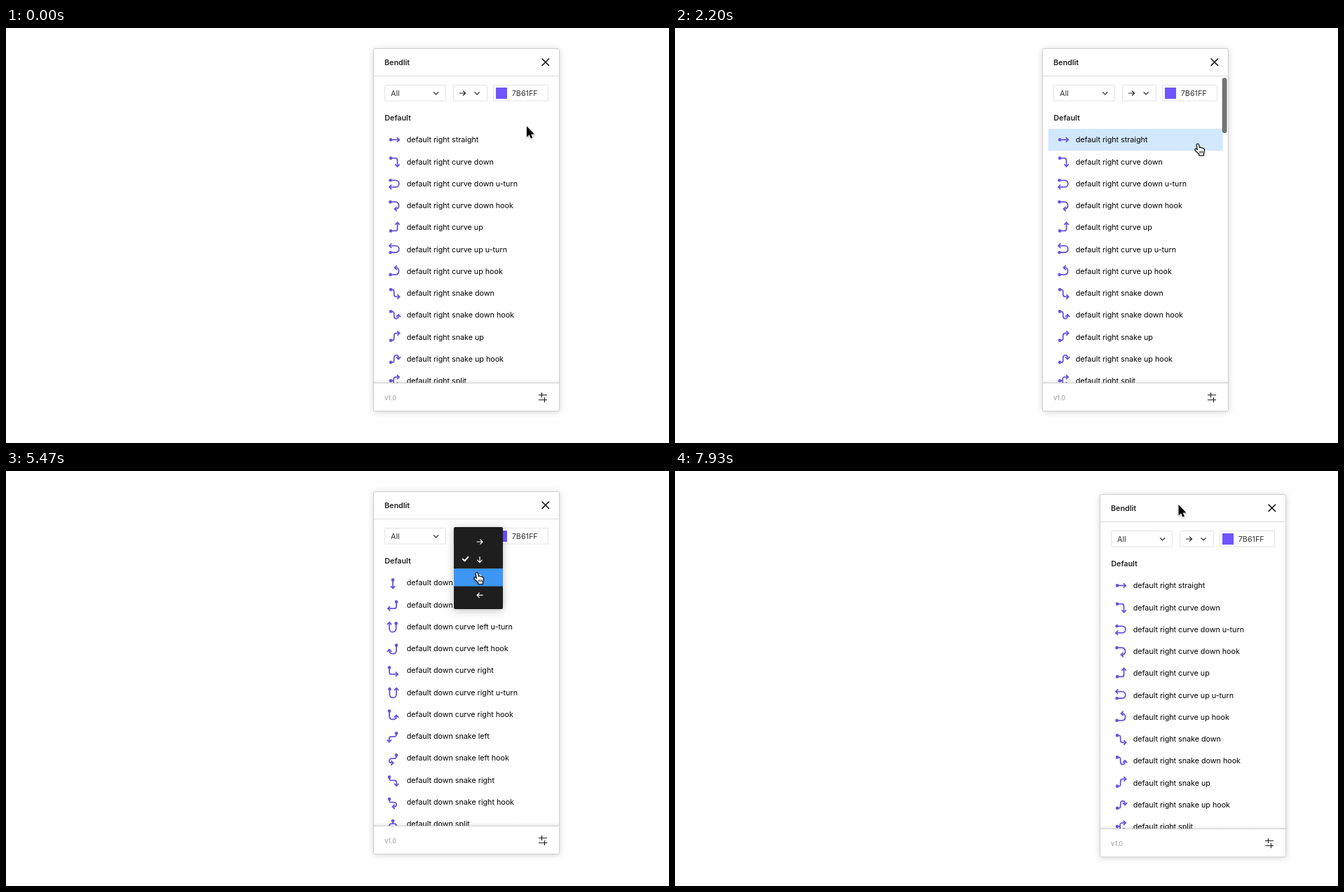
Recreate the animation shown at these times as an HTML page. Size 946x592 px, loop 8000 ms.

```html
<!DOCTYPE html>
<html lang="en">
<head>
<meta charset="utf-8">
<title>Connector panel</title>
<style>
  html, body { margin: 0; width: 100%; height: 100%; overflow: hidden; background: #fff; }
  svg { display: block; width: 946px; height: 592px; }
  text { font: 10.72px Inter, "Liberation Sans", sans-serif; fill: #000; white-space: pre; }
  .bold { font-weight: 600; fill: #222; }
  .ctl { fill: #333; }
  .box { fill: #fff; stroke: #e3e3e3; }
  .line { fill: none; stroke: #222; stroke-width: 1.2; stroke-linecap: round; stroke-linejoin: round; }
  .ico { fill: none; stroke: #6b52e0; stroke-width: 1.8; stroke-linecap: round; stroke-linejoin: round; }
  .ico .dot { fill: #6b52e0; stroke: none; }
  .ico .dash { stroke-dasharray: 2.6 3.2; }
  .shade { filter: drop-shadow(0 1px 4px rgba(0, 0, 0, .17)); }
  .menu { filter: drop-shadow(0 2px 6px rgba(0, 0, 0, .25)); }
  .ptr { filter: drop-shadow(0 1px 1px rgba(0, 0, 0, .3)); }
</style>
</head>
<body>
<svg viewBox="0 0 946 592" xmlns="http://www.w3.org/2000/svg">
  <defs>
    <clipPath id="view"><rect x="525" y="114" width="264" height="392"/></clipPath>
    <linearGradient id="fade" x2="0" y2="1">
      <stop offset="0" stop-opacity="0"/><stop offset="1" stop-opacity=".08"/>
    </linearGradient>
  </defs>
  <g id="panel">
    <rect class="shade" x="524.5" y="29.5" width="265" height="517" rx="2" fill="#fff" stroke="#cfcfcf"/>
    <g clip-path="url(#view)">
      <g id="hover"></g>
      <g id="lists"></g>
    </g>
    <text class="bold" x="540" y="52.9">Bendlit</text>
    <path class="line" style="stroke:#000;stroke-width:1.4" d="M765 44l9.6 9.6M774.6 44l-9.6 9.6"/>
    <path d="M525 68.5H789" stroke="#dcdcdc"/>
    <rect class="box" x="540.5" y="81.5" width="87" height="22.5" rx="1"/>
    <rect class="box" x="638.5" y="81.5" width="48" height="22.5" rx="1"/>
    <rect class="box" x="695.5" y="81.5" width="78" height="22.5" rx="1"/>
    <text class="ctl" x="549" y="96.9">All</text>
    <path class="line" d="M610.4 91.6l3.2 3.2 3.2-3.2M668.9 91.6l3.2 3.2 3.2-3.2"/>
    <g id="now" class="line"><path d="M-4 0H4M.8-3.2L4 0 .8 3.2"/></g>
    <rect x="699" y="85" width="16" height="16" fill="#7054ff"/>
    <text class="ctl" x="721.8" y="96.9">7B61FF</text>
    <rect x="525" y="502" width="264" height="4" fill="url(#fade)"/>
    <path d="M525 506.5H789" stroke="#d2d2d2"/>
    <text x="540" y="530.6" style="font-size:9.2px;fill:#999">v1.0</text>
    <path class="line" style="stroke-linecap:butt" d="M760 523.5h12M764.5 520v7M760 530.5h12M768.5 527v7"/>
    <rect id="thumb" x="780.7" y="71" width="6.8" height="79" rx="3.4" fill="#737373"/>
    <g id="menu">
      <rect class="menu" x="639" y="80" width="70" height="117" rx="2" fill="#1e1e1e"/>
      <rect id="pick" x="639" width="70" height="25.4" fill="#3d96f3"/>
      <g id="opts" class="line" style="stroke:#fff"></g>
      <path id="tick" class="line" style="stroke:#fff;stroke-width:2" d="M651.8 0l2.6 2.6 5-5.4"/>
    </g>
  </g>
  <g id="arrow" class="ptr">
    <path d="M0 0V15.6L3.6 12.3 5.9 17.4 8.3 16.4 6.1 11.4H10.9Z" stroke="#fff" stroke-width="1.2" paint-order="stroke"/>
  </g>
  <g id="hand" class="ptr">
    <path fill="#fff" stroke="#000" stroke-width="1.1" stroke-linejoin="round"
      d="M-1.8 2.2C-2.2 0 .8-.7 1.4 1.6L2.4 5.8C3.2 4.8 5 5 5.3 6.3 6.2 5.6 7.4 6 7.7 7.2 8.6 6.8 9.4 7.4 9.4 8.6 9.5 11 9.1 12.5 8.4 14V16.8H1.8V15C0 13.2-1.6 11.5-3.4 9.8-5.2 8-3.4 6.4-1.6 7.6L-.6 8.6Z"/>
    <path stroke="#000" stroke-width=".9" d="M2.9 10.3v3.4M4.9 10.3v3.4M6.9 10.3v3.4"/>
  </g>
</svg>
<script>
const $ = id => document.getElementById(id);
const ROW = 31.25, FIRST = 159.4, SECTION = 414, TICK = 200 / 3, TICKS = 120;
const ITEM = 25.4, ITEM_TOP = 88.3;

// Icon shapes for the "right" direction: start dot, path, arrow heads [x, y, angle]
const shapes = {
  straight: [-5, 0, "H7", [7, 0, 0]],
  curve: [-5, -5, "H1.5Q4.5-5 4.5-2V7", [4.5, 7, 90]],
  uturn: [-5.5, -4.6, "H2A4.8 4.8 0 0 1 2 5H-7", [-7, 5, 180]],
  hook: [-5.5, -5, "H1.5C8-5 8 5 2.5 5H.5", [.5, 5, 180]],
  snake: [-5, -5, "H-3.5Q-.3-5-.3-2V2Q-.3 5.2 3 5.2H7.5", [7.5, 5.2, 0]],
  snakeHook: [-5, -5, "H-3.5Q-.3-5-.3-2V1C-.3 6.4 6 6.4 6 2V-.5", [6, -.5, -90]],
  split: [-5, 0, "H-1M7-5.2H3Q-1-5.2-1-2V2Q-1 5.2 3 5.2H7", [7, -5.2, 0], [7, 5.2, 0]]
};

function glyph(kind, shape) {
  const [x, y, d, ...heads] = shapes[shape];
  const ring = (r, extra) => `<circle cx="${x}" cy="${y}" r="${r}" ${extra}/>`;
  let out = `<path d="M${x} ${y}${d}" ${kind === "dashed" ? 'class="dash"' : ""}/>`;
  for (const [hx, hy, a] of heads)
    out += `<path d="M-2.7-2.7L0 0-2.7 2.7" transform="translate(${hx} ${hy}) rotate(${a})"/>`;
  if (kind === "tap") out += ring(5.4, "");
  if (kind === "double tap") out += ring(4, 'stroke-width="1.2"') + ring(6.4, 'stroke-width="1.2"');
  if (kind === "long press")
    out += ring(6.8, 'class="dot" opacity=".25"') + ring(4.4, 'class="dot" opacity=".4"');
  return out + ring(2.3, 'class="dot"');
}

function variants([a, b]) {
  const list = [["straight", "straight", 1]];
  [a, b].forEach((s, i) => list.push(
    [`curve ${s}`, "curve", 1 - 2 * i],
    [`curve ${s} u-turn`, "uturn", 1 - 2 * i],
    [`curve ${s} hook`, "hook", 1 - 2 * i]));
  [a, b].forEach((s, i) => list.push(
    [`snake ${s}`, "snake", 1 - 2 * i],
    [`snake ${s} hook`, "snakeHook", 1 - 2 * i]));
  return [...list, ["split", "split", 1]];
}

const dirs = {
  right: { sides: ["down", "up"], at: [554, 0], turn: "", angle: 0 },
  down: { sides: ["left", "right"], at: [552, 1], turn: "rotate(90)", angle: 90 },
  up: { sides: ["left", "right"], at: [552, 0], turn: "scale(1 -1) rotate(90)", angle: -90 }
};

const label = (x, y, s, cls = "") => `<text x="${x}" y="${y + 3.9}" class="${cls}">${s}</text>`;
const heading = (y, s) => label(540.3, y, s[0].toUpperCase() + s.slice(1), "bold");

function section(kind, dir, top) {
  const { sides, at, turn } = dirs[dir];
  return heading(top - ROW, kind) + variants(sides).map(([name, shape, flip], i) => {
    const y = top + i * ROW;
    return `<g class="ico" transform="translate(${at[0]} ${y + at[1]}) ${turn} scale(1 ${flip})">${glyph(kind, shape)}</g>`
      + label(571.7, y, `${kind} ${dir} ${name}`);
  }).join("");
}

function blocks(top) {
  return heading(top - ROW, "block") + ["default", "dashed"].map((s, i) => {
    const y = top + i * ROW;
    const dash = i ? 'stroke-dasharray="4 4.4" stroke-dashoffset="2"' : "";
    return `<g class="ico"><rect x="544.6" y="${y - 7.4}" width="14.8" height="14.8" rx="2" stroke-width="1.6" ${dash}/></g>`
      + label(571.7, y, `block ${s}`);
  }).join("");
}

const kinds = ["default", "dashed", "tap", "double tap", "long press"];
$("lists").innerHTML = Object.keys(dirs).map(dir => {
  const body = kinds.map((k, i) => section(k, dir, FIRST + i * SECTION)).join("");
  return `<g id="${dir}">${body}${blocks(FIRST + 5 * SECTION)}</g>`;
}).join("");

$("hover").innerHTML = Array.from({ length: 12 }, (_, i) =>
  `<rect x="532.6" y="${FIRST + (i - .5) * ROW}" width="249" height="${ROW}" fill="#d2e8fc"/>`).join("");
const bands = [...$("hover").children];

$("opts").innerHTML = [0, 90, -90, 180].map((a, i) =>
  `<path d="M-4 0H4M.8-3.2L4 0 .8 3.2" transform="translate(676 ${ITEM_TOP + (i + .5) * ITEM}) rotate(${a})"/>`).join("");

// Tracks: [tick, value...], 15 ticks per second
const scroll = [[5, 0], [6, 34], [10, 330], [13, 540], [15, 620], [18, 900], [22, 1520],
  [25, 1773], [27, 1776], [28, 1640], [32, 60], [33, 0]];
const thumbAlpha = [[5, 0], [6, 1], [38, 1], [41, 0]];
const panel = [[103, 0, 0], [107, -171, 17.5], [112, -171, 17.5], [119, 82, 4]];
const pointer = [[0, 743, 140], [4, 746, 165], [35, 746, 165], [39, 705, 320], [42, 665, 480],
  [45, 632, 330], [48, 616, 190], [49, 615, 200], [50, 616, 218], [52, 630, 205], [55, 660, 100],
  [58, 667, 93], [61, 672, 104], [62, 672, 110], [64, 672, 126], [67, 672, 126], [73, 667, 93],
  [77, 668, 94], [79, 672, 120], [82, 672, 144.5], [85, 672, 144.5], [88, 667, 94], [90, 667, 94],
  [91, 672, 150], [92, 672, 150], [97, 672, 101], [100, 672, 101], [102, 634, 45], [103, 634, 45],
  [107, 462, 62], [112, 462, 62], [119, 718.5, 48]];
const menuOpen = [[56, 67], [75, 84], [89, 100]];

function at(track, t) {
  const i = track.findIndex(k => k[0] > t);
  if (i === 0) return track[0].slice(1);
  if (i < 0) return track[track.length - 1].slice(1);
  const a = track[i - 1], b = track[i], p = (t - a[0]) / (b[0] - a[0]);
  return a.slice(1).map((v, j) => v + (b[j + 1] - v) * p);
}

const isOpen = t => menuOpen.some(([a, b]) => t >= a && t < b);
const dirAt = t => t < 67 || t >= 100 ? "right" : t < 84 ? "down" : "up";

function hoveredRow(t) {
  if (t < 0 || isOpen(t) || at(scroll, t)[0] > 0) return -1;
  const y = at(pointer, t)[1];
  return y < FIRST - ROW / 2 ? -1 : Math.round((y - FIRST) / ROW);
}

const show = (el, on) => el.style.display = on ? "" : "none";
const move = (el, x, y, extra = "") => el.setAttribute("transform", `translate(${x} ${y}) ${extra}`);

function draw(t) {
  const [s] = at(scroll, t), [px, py] = at(panel, t), [cx, cy] = at(pointer, t);
  const dir = dirAt(t), open = isOpen(t);
  move($("panel"), px, py);
  move($("lists"), 0, -s);
  for (const d in dirs) show($(d), d === dir);
  move($("now"), 651.5, 93, `rotate(${dirs[dir].angle})`);

  $("thumb").setAttribute("y", 71 + s * .1743);
  $("thumb").setAttribute("opacity", at(thumbAlpha, t)[0]);

  // A band fades out over three ticks after the pointer leaves it
  const recent = [0, 1, 2].map(age => hoveredRow(t - age));
  bands.forEach((b, i) => {
    const age = recent.indexOf(i);
    b.setAttribute("opacity", age < 0 || s > 0 ? 0 : 1 - age / 3);
  });

  show($("menu"), open);
  const item = Math.max(0, Math.min(3, Math.floor((cy - ITEM_TOP) / ITEM)));
  $("pick").setAttribute("y", ITEM_TOP + item * ITEM);
  move($("tick"), 0, ITEM_TOP + (["right", "down", "up"].indexOf(dir) + .5) * ITEM - .8);

  const hand = open || cy > FIRST - ROW / 2;
  show($("hand"), hand);
  show($("arrow"), !hand);
  move($(hand ? "hand" : "arrow"), cx, cy);
}

const start = performance.now();
function loop() {
  const ms = (performance.now() - start) % 8000;
  draw(Math.min(TICKS - 1, Math.floor((ms + 5) / TICK)));
  requestAnimationFrame(loop);
}
loop();
</script>
</body>
</html>
```
